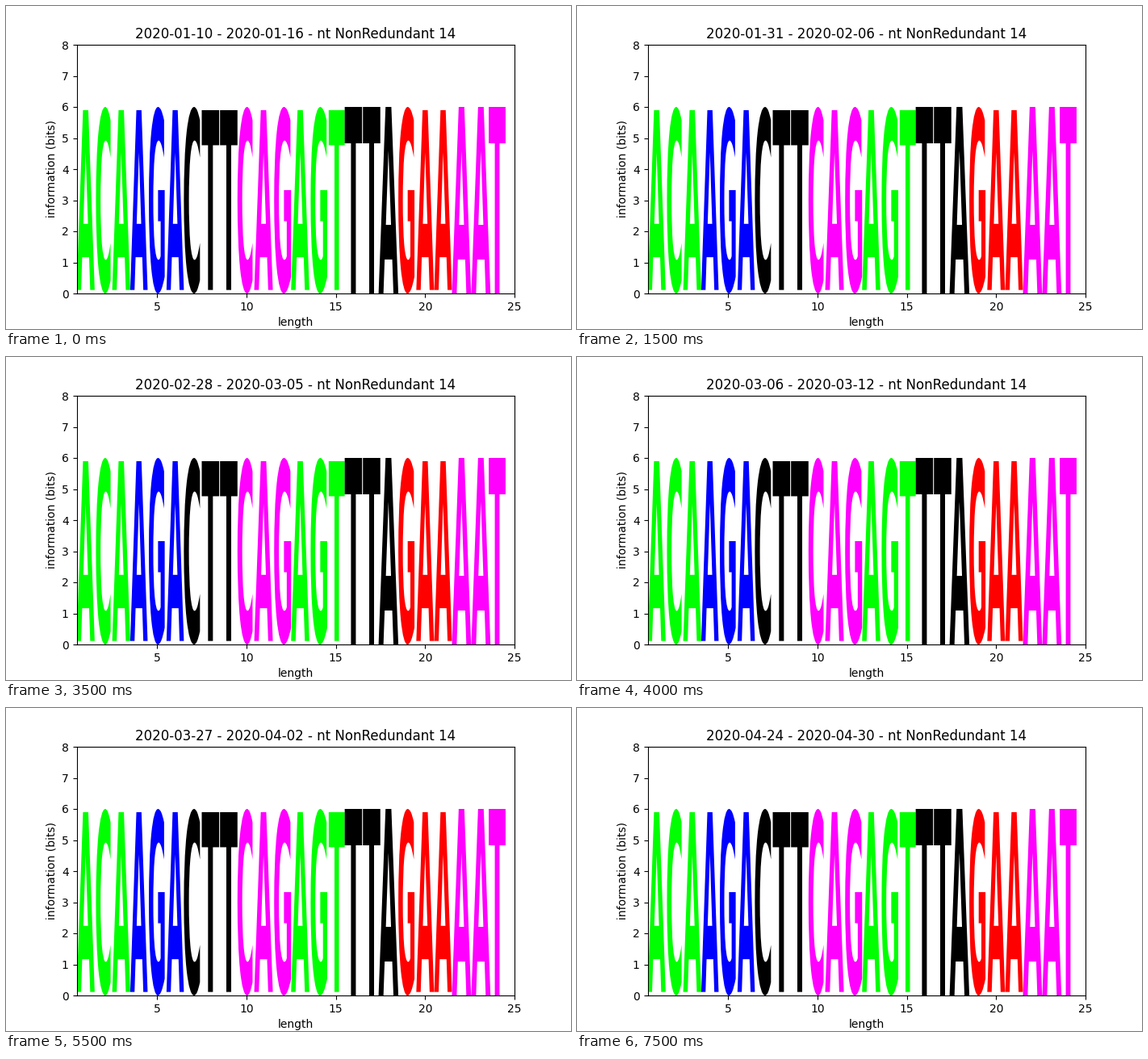
Recreate the animation shown at these times as a matplotlib script. Size 700x400 px, loop 8 s.

```python
import matplotlib.pyplot as plt
import numpy as np
from matplotlib.animation import FuncAnimation
from matplotlib.patches import PathPatch
from matplotlib.textpath import TextPath
from matplotlib.transforms import Affine2D

plt.rcParams["font.family"] = "DejaVu Sans"

WEEKS = 16
START = np.datetime64("2020-01-10")
BITS = 6
CODONS = [
    ("ACA", "lime"), ("AGA", "blue"), ("CTT", "black"), ("CAG", "magenta"),
    ("AGT", "lime"), ("TTA", "black"), ("GAA", "red"), ("AAT", "magenta"),
]


def draw_codon(ax, codon, color, x, height):
    """Fill a box three positions wide with the outline of a codon."""
    path = TextPath((0, 0), codon, size=1,
                    prop={"family": "DejaVu Sans", "weight": "bold"})
    box = path.get_extents()
    fit = (Affine2D().translate(-box.x0, -box.y0)
           .scale(len(codon) / box.width, height / box.height)
           .translate(x, 0))
    ax.add_patch(PathPatch(fit.transform_path(path), fc=color, lw=0))


fig, ax = plt.subplots(figsize=(7, 4), dpi=100)
ax.set(xlim=(0.5, 25), ylim=(0, 8), xlabel="length",
       ylabel="information (bits)")
ax.set_xticks(range(5, 26, 5))
ax.set_yticks(range(9))
title = ax.set_title("")

for i, (codon, color) in enumerate(CODONS):
    draw_codon(ax, codon, color, 0.5 + 3 * i, BITS)


def update(week):
    first = START + 7 * week
    title.set_text(f"{first} - {first + 6} - nt NonRedundant 14")
    return [title]


anim = FuncAnimation(fig, update, frames=WEEKS, interval=500,
                     repeat=True, repeat_delay=0)
plt.show()
```
